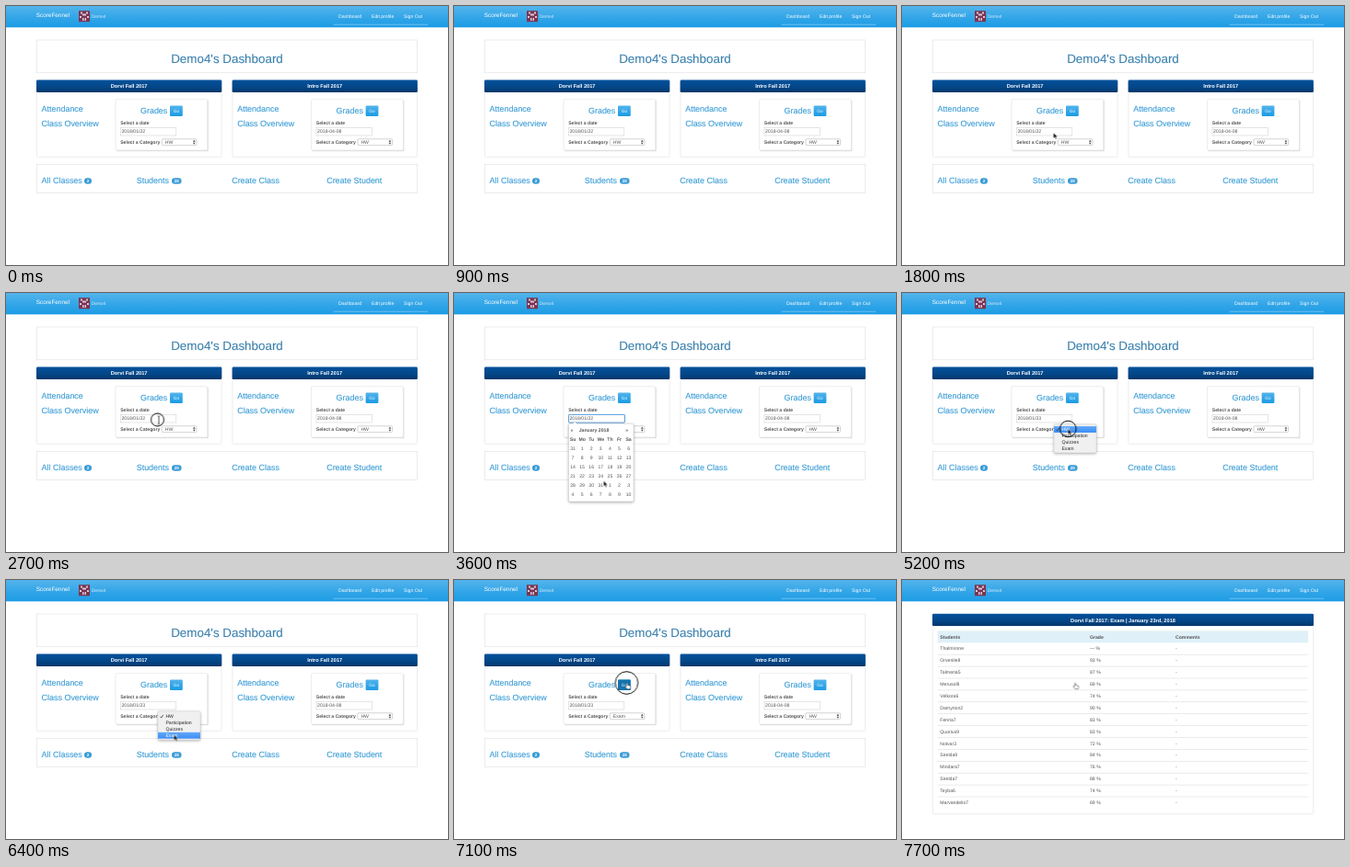
An HTML page that plays this animation: 480x282 px, repeating every 8 s.

```html
<!DOCTYPE html>
<html lang="en">
<head>
<meta charset="utf-8">
<title>Dashboard demo</title>
<style>
html, body { margin: 0; width: 100%; height: 100%; overflow: hidden; background: #fff; }
svg { display: block; width: 100%; height: 100%; }
text { font-family: "Liberation Sans", Arial, sans-serif; font-size: 5.15px; fill: #555; text-rendering: geometricPrecision; white-space: pre; }
.bold { font-weight: bold; }
.mid { text-anchor: middle; }
.white { fill: #fff; }
.link { font-size: 8.95px; fill: #3b9dd6; stroke: #3b9dd6; stroke-width: .13px; }
.title { font-size: 13.4px; fill: #3b80ad; stroke: #3b80ad; stroke-width: .12px; }
.head { font-size: 5.65px; font-weight: bold; fill: #fff; }
.box { fill: #fff; stroke: #e4e4e4; stroke-width: .7px; }
.field { fill: #fff; stroke: #d2d2d2; stroke-width: .6px; }
.pop { filter: drop-shadow(0 1px 1.5px rgba(0, 0, 0, .3)); }

.anim { animation: 8s step-end infinite; }
#home { animation-name: home; }
#report { opacity: 0; animation-name: report; }
#picker, #focus { opacity: 0; animation-name: picker; }
#oldDate { animation-name: oldDate; }
#newDate { opacity: 0; animation-name: newDate; }
#menu { opacity: 0; animation-name: menu; }
#oldKind { animation-name: oldKind; }
#newKind { opacity: 0; animation-name: newKind; }
#pressed { opacity: 0; animation-name: pressed; }
#lit0 { animation-name: lit0; }
#lit1 { opacity: 0; animation-name: lit1; }
#lit2 { opacity: 0; animation-name: lit2; }
#lit3 { opacity: 0; animation-name: lit3; }
#arrow { animation-name: arrow; }
#beam { opacity: 0; animation-name: beam; }
#hand { opacity: 0; animation-name: hand; }
#pointer { animation: move 8s ease-in-out infinite; }
#ring { opacity: 0; animation: ring 8s step-end infinite, grow 8s linear infinite; }

@keyframes home { 0% { opacity: 1 } 93.75%, 100% { opacity: 0 } }
@keyframes report { 0% { opacity: 0 } 93.75%, 100% { opacity: 1 } }
@keyframes picker { 0% { opacity: 0 } 35% { opacity: 1 } 53.75%, 100% { opacity: 0 } }
@keyframes oldDate { 0% { opacity: 1 } 53.75%, 100% { opacity: 0 } }
@keyframes newDate { 0% { opacity: 0 } 53.75%, 100% { opacity: 1 } }
@keyframes menu { 0% { opacity: 0 } 63.75% { opacity: 1 } 82.5%, 100% { opacity: 0 } }
@keyframes oldKind { 0% { opacity: 1 } 82.5%, 100% { opacity: 0 } }
@keyframes newKind { 0% { opacity: 0 } 82.5%, 100% { opacity: 1 } }
@keyframes pressed { 0% { opacity: 0 } 86.25%, 100% { opacity: 1 } }
@keyframes lit0 { 0% { opacity: 1 } 70%, 100% { opacity: 0 } }
@keyframes lit1 { 0% { opacity: 0 } 70% { opacity: 1 } 73.75%, 100% { opacity: 0 } }
@keyframes lit2 { 0% { opacity: 0 } 73.75% { opacity: 1 } 76.25%, 100% { opacity: 0 } }
@keyframes lit3 { 0% { opacity: 0 } 76.25%, 100% { opacity: 1 } }
@keyframes arrow { 0% { opacity: 1 } 28.75% { opacity: 0 } 37.5% { opacity: 1 } 86.25%, 100% { opacity: 0 } }
@keyframes beam { 0% { opacity: 0 } 28.75% { opacity: 1 } 37.5%, 100% { opacity: 0 } }
@keyframes hand { 0% { opacity: 0 } 86.25%, 100% { opacity: 1 } }
@keyframes move {
  0%, 12.5% { transform: translate(275px, -14px); animation-timing-function: linear }
  16.25% { transform: translate(233px, 53px); animation-timing-function: ease-out }
  20% { transform: translate(157px, 149px) }
  22.5%, 38.75% { transform: translate(164.5px, 138px) }
  45% { transform: translate(162.5px, 204.5px) }
  50%, 55% { transform: translate(149px, 200px) }
  62.5%, 67.5% { transform: translate(180.3px, 148px) }
  78.75%, 82.5% { transform: translate(182.5px, 168.5px) }
  86.25%, 100% { transform: translate(187.5px, 112px) }
}
@keyframes ring {
  0% { opacity: 0 } 33.75% { opacity: 1 } 36.25% { opacity: 0 }
  52.5% { opacity: 1 } 55% { opacity: 0 }
  63.75% { opacity: 1 } 66.25% { opacity: 0 }
  87.5% { opacity: 1 } 91.25%, 100% { opacity: 0 }
}
@keyframes grow {
  0%, 33.75% { r: 7px } 36.25% { r: 12px }
  52.5% { r: 7px } 55% { r: 12px }
  63.75% { r: 6.5px } 65% { r: 8.8px } 66.25% { r: 12px }
  87.5% { r: 9px } 88.75%, 100% { r: 12.3px }
}
</style>
</head>
<body>
<svg viewBox="0 0 480 282" preserveAspectRatio="none">
  <defs>
    <linearGradient id="sky" x2="0" y2="1">
      <stop stop-color="#54b4eb"/><stop offset=".6" stop-color="#2fa4e7"/><stop offset="1" stop-color="#1d9ce5"/>
    </linearGradient>
    <linearGradient id="navy" x2="0" y2="1">
      <stop stop-color="#04519b"/><stop offset=".6" stop-color="#044687"/><stop offset="1" stop-color="#033769"/>
    </linearGradient>
    <linearGradient id="pick" x2="0" y2="1">
      <stop stop-color="#5fa8fa"/><stop offset="1" stop-color="#3d8df4"/>
    </linearGradient>
  </defs>
  <rect width="480" height="282" fill="#fff"/>

  <g id="home" class="anim">
    <rect class="box" x="33.3" y="37" width="413.4" height="35.7"/>
    <text class="title mid" x="240" y="61.7">Demo4's Dashboard</text>
    <g id="cards"></g>
    <rect class="box" x="33.3" y="172.4" width="413.4" height="31.2"/>
    <g id="links"></g>
    <rect id="focus" class="anim" x="124.6" y="132.4" width="61" height="8.8" rx=".8" fill="none" stroke="#5b9fe0" stroke-width="1"/>
    <g id="picker" class="anim">
      <path class="pop" d="M126 142.3h3l2.2-2.3 2.2 2.3H193.500a1.500 1.500 0 0 1 1.500 1.500V225.500a1.500 1.500 0 0 1-1.500 1.500H126a1.500 1.500 0 0 1-1.500-1.500V143.800a1.500 1.500 0 0 1 1.500-1.500z" fill="#fff" stroke="#c8c8c8" stroke-width=".5"/>
    </g>
    <g id="menu" class="anim">
      <rect class="pop" x="165" y="143" width="46" height="31" rx="1.6" fill="#f0f0f0" stroke="#c4c4c4" stroke-width=".4"/>
    </g>
  </g>

  <g id="report" class="anim">
    <rect class="box" x="33.3" y="38" width="413.4" height="216.7" rx="1.3"/>
    <rect x="33" y="36.8" width="414" height="13.2" rx="1.3" fill="url(#navy)"/>
    <text class="head mid" x="240" y="45.5">Dorvi Fall 2017: Exam | January 23rd, 2018</text>
    <rect x="38.700" y="55.300" width="402.500" height="13" fill="#dff0f8"/>
  </g>

  <rect width="480" height="23.3" fill="url(#sky)"/>
  <text class="white" x="32.700" y="12.200" style="font-size:6.4px">ScoreFennel</text>
  <g id="avatar">
    <rect x="79" y="5.200" width="12" height="12" fill="#7d3450"/>
    <path d="M81 6.500h2v2h-2zM87 6.500h2v2h-2zM83 8.500h4v2h-4zM80 11h2v2h-2zM88 11h2v2h-2zM83 13h1.500v3H83zM85.500 13H87v3h-1.500z" fill="#d9c6d6"/>
  </g>
  <text x="92.800" y="12.900" fill-opacity=".8" class="white" style="font-size:4.9px">Demo4</text>
  <g class="white">
    <text class="white" x="361" y="13">Dashboard</text>
    <text class="white" x="397" y="13">Edit profile</text>
    <text class="white" x="432" y="13">Sign Out</text>
  </g>
  <path d="M355.500 20.200H458" stroke="#fff" stroke-opacity=".5" stroke-width=".7"/>

  <g id="pointer">
    <circle id="ring" r="9" fill="none" stroke="#111" stroke-width="1"/>
    <path id="arrow" class="anim" d="M0 0V6.100L1.400 4.800 2.400 7 3.500 6.500 2.500 4.400H4.400z" fill="#111" stroke="#fff" stroke-width=".4"/>
    <path id="beam" class="anim" d="M0-4.300Q1.500-4.300 1.500-3V4Q1.500 5.300 0 5.300M3-4.300Q1.500-4.300 1.500-3V4Q1.500 5.300 3 5.300" fill="none" stroke="#333" stroke-width=".6"/>
    <path id="hand" class="anim" d="M0 .6Q.7-.3 1.300.6V2.600L4 3.200Q4.500 3.400 4.300 4.400L3.700 6.800H.6L-1.500 3.900Q-1.400 3 0 3.900z" fill="#fff" stroke="#333" stroke-width=".5"/>
  </g>
</svg>
<script>
const $ = id => document.getElementById(id);
const add = (id, markup) => $(id).insertAdjacentHTML('beforeend', markup);
const text = (x, y, str, cls = '', more = '') => `<text x="${x}" y="${y}" class="${cls}" ${more}>${str}</text>`;
const rect = (x, y, w, h, more) => `<rect x="${x}" y="${y}" width="${w}" height="${h}" ${more}/>`;

function card(x, name, date, kind) {
  return `<g transform="translate(${x})">` +
    rect(.3, 81, 200.7, 83.6, 'class="box" rx="1.3"') +
    rect(0, 80.6, 201.3, 13.4, 'rx="1.3" fill="url(#navy)"') +
    text(100.6, 89.4, name, 'head mid') +
    text(5.6, 114.7, 'Attendance', 'link') +
    text(5.6, 131.2, 'Class Overview', 'link') +
    rect(87, 102.4, 99.8, 55.8, 'rx="1" fill="#ddd"') +
    rect(86, 101.7, 99.8, 55.4, 'class="box" rx="1"') +
    text(113, 117.4, 'Grades', 'link') +
    rect(145, 108.5, 13.8, 11.4, 'rx="1" fill="url(#sky)"') +
    (x < 100 ? rect(145, 108.5, 13.8, 11.4, 'id="pressed" class="anim" rx="1" fill="#1573ad"') : '') +
    text(151.9, 115.9, 'Go', 'white mid', 'style="font-size:4.7px"') +
    text(91.2, 128.6, 'Select a date', 'bold') +
    rect(91.4, 132.4, 60.4, 8.6, 'class="field"') + date +
    text(91.2, 150.1, 'Select a Category', 'bold') +
    rect(136.3, 144.8, 37.6, 6.9, 'class="field" rx="1" style="stroke:#b5b5b5"') + kind +
    '<path d="M170 147.700l1.300-1.900 1.300 1.900zM170 148.800l1.300 1.900 1.300-1.900z" fill="#444"/></g>';
}

const date = (str, more) => text(92.5, 138.4, str, 'anim', more);
const kind = (str, more) => text(139.8, 150.1, str, 'anim', more);
add('cards',
  card(33, 'Dorvi Fall 2017',
    date('2018/01/22', 'id="oldDate"') + date('2018/01/23', 'id="newDate"'),
    kind('HW', 'id="oldKind"') + kind('Exam', 'id="newKind"')) +
  card(245.6, 'Intro Fall 2017', date('2018-04-08'), kind('HW')));

const badge = (x, w, n) => rect(x, 187.2, w, 6.6, 'rx="3.2" fill="#3b9dd6"') +
  text(x + w / 2, 192.1, n, 'bold white mid', 'style="font-size:4.5px"');
add('links',
  text(38.6, 193.2, 'All Classes', 'link') + badge(85, 8, 2) +
  text(141.7, 193.2, 'Students', 'link') + badge(180, 10.6, 28) +
  text(245.2, 193.2, 'Create Class', 'link') +
  text(348.2, 193.2, 'Create Student', 'link'));

// Calendar: six weeks starting on 31 December
const col = i => 129 + 10.1 * i;
add('picker', text(128, 151.4, '«', 'bold mid') + text(152, 151.4, 'January 2018', 'bold mid') + text(187.700, 151.4, '»', 'bold mid'));
['Su', 'Mo', 'Tu', 'We', 'Th', 'Fr', 'Sa'].forEach((d, i) => add('picker', text(col(i), 161.3, d, 'bold mid')));
for (let i = 0; i < 42; i++) {
  add('picker', text(col(i % 7), 171.4 + 10 * Math.floor(i / 7), (i + 30) % 31 + 1, 'mid'));
}

['HW', 'Participation', 'Quizzes', 'Exam'].forEach((name, i) => {
  const y = 150.3 + 6.9 * i;
  add('menu', text(173.4, y, name, '', 'style="fill:#222"') +
    `<g id="lit${i}" class="anim">` + rect(165, y - 5.2, 46, 6.9, 'fill="url(#pick)"') + text(173.4, y, name, 'white') + '</g>');
});
add('menu', '<path d="M167.600 148.700l1.100 1.400 1.900-3.200" fill="none" stroke="#222" stroke-width=".7"/>');

const grades = [
  ['Thalmirone', '—'], ['Orvenile8', 93], ['Talmeria5', 87], ['Merusol8', 69], ['Velkora6', 74],
  ['Damyrion2', 90], ['Fenria7', 83], ['Quorius9', 83], ['Nolvar3', 72], ['Sirelda9', 84],
  ['Mindara7', 76], ['Sirelda7', 88], ['Teyba6', 74], ['Marvandelio7', 69]
];
const row = (y, cells, cls) => cells.map((c, i) => text([41.3, 204, 297][i], y, c, cls)).join('');
add('report', row(63.6, ['Students', 'Grade', 'Comments'], 'bold'));
grades.forEach(([name, n], i) => {
  const y = 76.3 + 12.9 * i;
  add('report', row(y, [name, n + ' %', '-']));
  if (i) add('report', rect(38.7, y - 8.3, 402.5, .6, 'fill="#dcdcdc"'));
});
</script>
</body>
</html>
```
